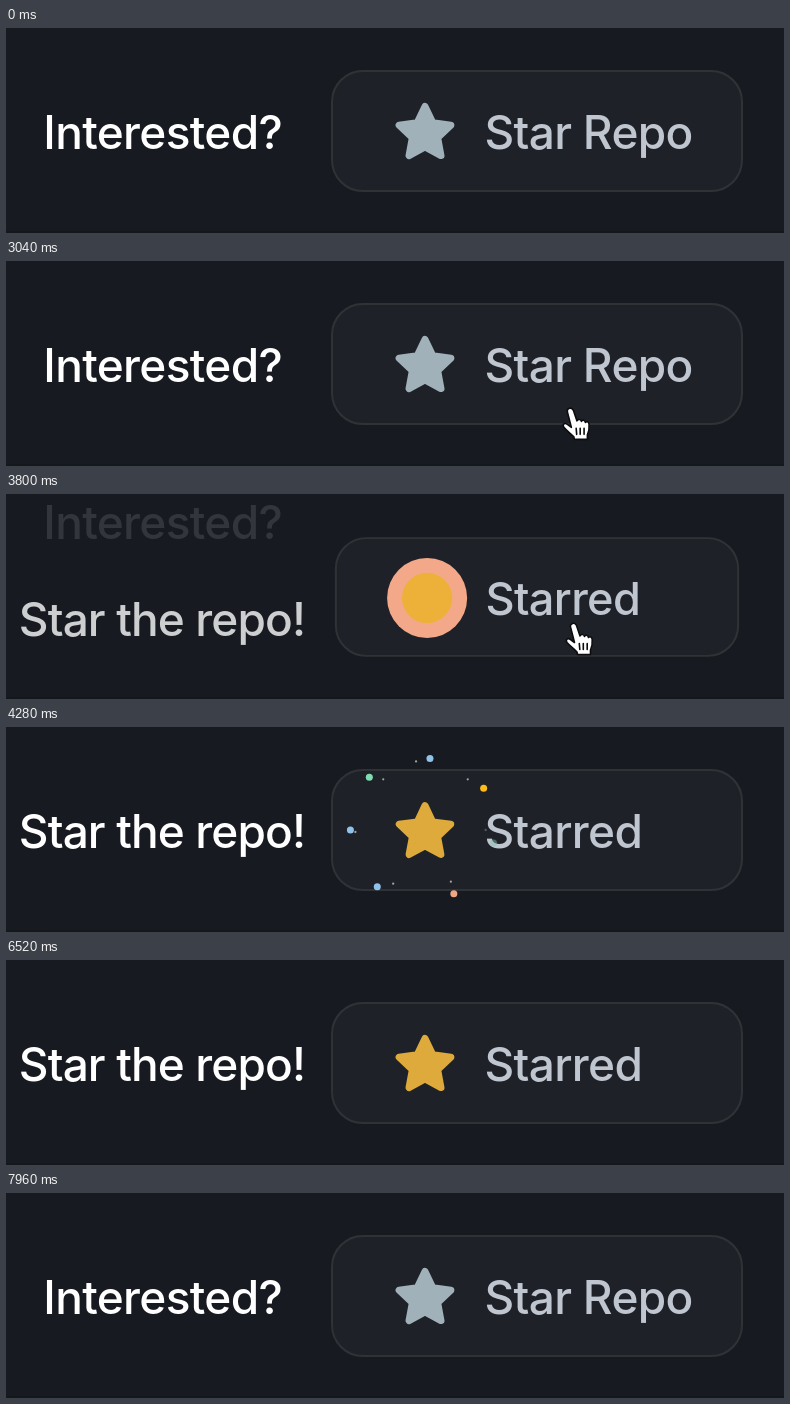
An HTML page that plays this animation: 778x205 px, repeating every 8000 ms.

```html
<!DOCTYPE html>
<html lang="en">
<head>
<meta charset="utf-8">
<title>Star button</title>
<style>
  html, body { margin: 0; width: 100%; height: 100%; overflow: hidden; background: #171b21; }
  svg { display: block; width: 778px; height: 205px; }
  text { font: 500 46px Inter, "Liberation Sans", sans-serif; letter-spacing: -.66px; fill: #fff; }
  #call { letter-spacing: -.88px; }
  #label { fill: #c0c6cf; }
</style>
</head>
<body>
<svg viewBox="0 0 778 205">
  <rect width="778" height="205" fill="#171b21"/>
  <rect y="203" width="778" height="2" fill="#14171c"/>
  <text id="ask" x="37.3" y="121">Interested?</text>
  <text id="call" x="12.8" y="121">Star the repo!</text>
  <g id="button">
    <rect id="face" x="326" y="43" width="410" height="120" rx="31" stroke="#303336" stroke-width="2"/>
    <circle id="bubble" cx="419" cy="104"/>
    <circle id="core" cx="419" cy="104" fill="#edb13a"/>
    <path id="star" stroke-width="7" stroke-linejoin="round"/>
    <text id="label" x="478.4" y="121"></text>
  </g>
  <g id="sparks"></g>
  <g id="cursor" stroke-linejoin="round" stroke-linecap="round">
    <g id="hand" fill="#fff" stroke="#0b0c0e" stroke-width="1.6">
      <path d="M-2.5 3C-3.5-.5 2-2.5 3.5 1.5L7 12C8 10 11 10 11.5 12.5C12.5 10.5 15 11 15.5 13.5C17 12 19 13 19.2 15.5C19.6 20 19 23 17.5 26L17.5 30.5H4.5L4 28C0 24-3 22-6 18.5C-8 15.5-5 13.5-2.5 15.5L1.5 18.5Z"/>
      <path d="M6.3 19.5L6.8 25.5M10.3 19.5V25.5M14.2 19.5V25.5" fill="none"/>
    </g>
    <path id="arrow" d="M0 0V25L6 19.5L10 29L14.5 27L10.5 18H18.5Z" fill="#0b0c0e" stroke="#fff" stroke-width="1.8"/>
  </g>
</svg>
<script>
const LOOP = 8000, PRESS = 3360, CLICK = 3560, RESET = 6980;
const GREY = [160, 177, 186], GOLD = [221, 170, 59], SALMON = [243, 169, 137];
const FLAT = [30, 33, 39], HELD = [40, 43, 48];
const $ = id => document.getElementById(id);
const set = (el, attrs) => { for (const k in attrs) el.setAttribute(k, attrs[k]); };
const span = (t, start, length) => Math.min(1, Math.max(0, (t - start) / length));
const out = u => 1 - (1 - u) ** 3;
const smooth = u => u * u * (3 - 2 * u);
const mix = (a, b, u) => a + (b - a) * u;
const blend = (a, b, u) => `rgb(${a.map((v, i) => Math.round(mix(v, b[i], u)))})`;
const zoom = (x, y, s) => `translate(${x} ${y}) scale(${s}) translate(${-x} ${-y})`;

const STAR = [419, 105.6];
$('star').setAttribute('d', 'M' + Array.from({ length: 10 }, (_, i) => {
  const a = i * Math.PI / 5, r = i % 2 ? 13.3 : 27.2;
  return `${STAR[0] + r * Math.sin(a)} ${STAR[1] - r * Math.cos(a)}`;
}).join('L') + 'Z');

// colour, large dot x/y, small dot x/y, opacity
const sparks = [
  ['#90c3ea', 5, -73, -9, -70, 1],
  ['#fdbb18', 59, -43, 43, -52, 1],
  ['#7fc4b4', 69, 12, 61, -1, .45],
  ['#f0a683', 29, 63, 26, 51, 1],
  ['#90c3ea', -48, 56, -32, 53, 1],
  ['#90c3ea', -75, -1, -70, 1, 1],
  ['#80dcb2', -56, -54, -42, -52, 1]
].flatMap(([fill, x, y, sx, sy, opacity]) =>
  [[x, y, 4.6, fill], [sx, sy, 1.5, '#a0a493']].map(([dx, dy, r, color]) => {
    const el = document.createElementNS('http://www.w3.org/2000/svg', 'circle');
    set(el, { fill: color, opacity });
    $('sparks').append(el);
    return { el, dx, dy, r };
  }));

const path = [
  [2690, 558, 214], [3220, 566, 124], [3400, 566, 120],
  [3620, 566, 120], [3800, 567, 130], [4140, 572, 216]
];

function slide(el, u, leaving) {
  set(el, {
    transform: `translate(0 ${leaving ? -97 * u : 97 * (1 - u)})`,
    opacity: leaving ? (1 - u) ** 1.4 : u
  });
}

function drawText(t) {
  const back = t >= RESET;
  const u = out(span(t, back ? RESET : CLICK, 600));
  slide($('ask'), u, !back);
  slide($('call'), u, back);
  $('label').textContent = t >= CLICK && t < RESET ? 'Starred' : 'Star Repo';
}

function drawButton(t) {
  const held = out(span(t, PRESS, 170)) * (1 - out(span(t, CLICK, 600)));
  const tint = span(t, PRESS, 150) * (1 - span(t, CLICK, 180));
  set($('button'), { transform: zoom(531, 103, 1 - .088 * held) });
  set($('face'), { fill: blend(FLAT, HELD, tint) });
}

function drawStar(t) {
  const gold = t < CLICK ? 0 : 1 - span(t, RESET, 200);
  const color = blend(GREY, GOLD, gold);
  const pop = span(t, 3800, 700);
  const popping = t >= CLICK && t < 4500;
  const size = popping ? 1 - Math.exp(-6 * pop) * Math.cos(9 * pop) * (1 - pop) : 1;
  set($('star'), { fill: color, stroke: color, transform: zoom(...STAR, size) });

  const on = t >= CLICK && t < 3960;
  const grow = out(span(t, CLICK, 220));
  set($('bubble'), {
    r: on ? 40.8 * grow : 0,
    fill: blend(GOLD, SALMON, span(t, CLICK, 200)),
    opacity: 1 - span(t, 3840, 110)
  });
  set($('core'), {
    r: on ? 25.5 * span(t, 3700, 100) + 14 * span(t, 3800, 100) : 0,
    opacity: 1 - span(t, 3850, 110)
  });
}

function drawSparks(t) {
  const u = span(t, 3820, 1200), k = .5 + .645 * out(u);
  const shown = u > 0 && u < 1;
  for (const { el, dx, dy, r } of sparks)
    set(el, { cx: 419 + dx * k, cy: 104 + dy * k, r: shown ? r * (1 - u ** 1.5) : 0 });
}

function drawCursor(t) {
  const i = path.findIndex((p, n) => n < path.length - 1 && t >= p[0] && t < path[n + 1][0]);
  $('cursor').style.display = i < 0 ? 'none' : '';
  if (i < 0) return;
  const [a, x, y] = path[i], [b, x2, y2] = path[i + 1];
  const u = smooth(span(t, a, b - a)), top = mix(y, y2, u);
  set($('cursor'), { transform: `translate(${mix(x, x2, u)} ${top})` });
  $('hand').style.display = top < 164 ? '' : 'none';
  $('arrow').style.display = top < 164 ? 'none' : '';
}

const begin = performance.now();
function frame() {
  const t = (performance.now() - begin) % LOOP;
  for (const draw of [drawText, drawButton, drawStar, drawSparks, drawCursor]) draw(t);
  requestAnimationFrame(frame);
}
frame();
</script>
</body>
</html>
```
